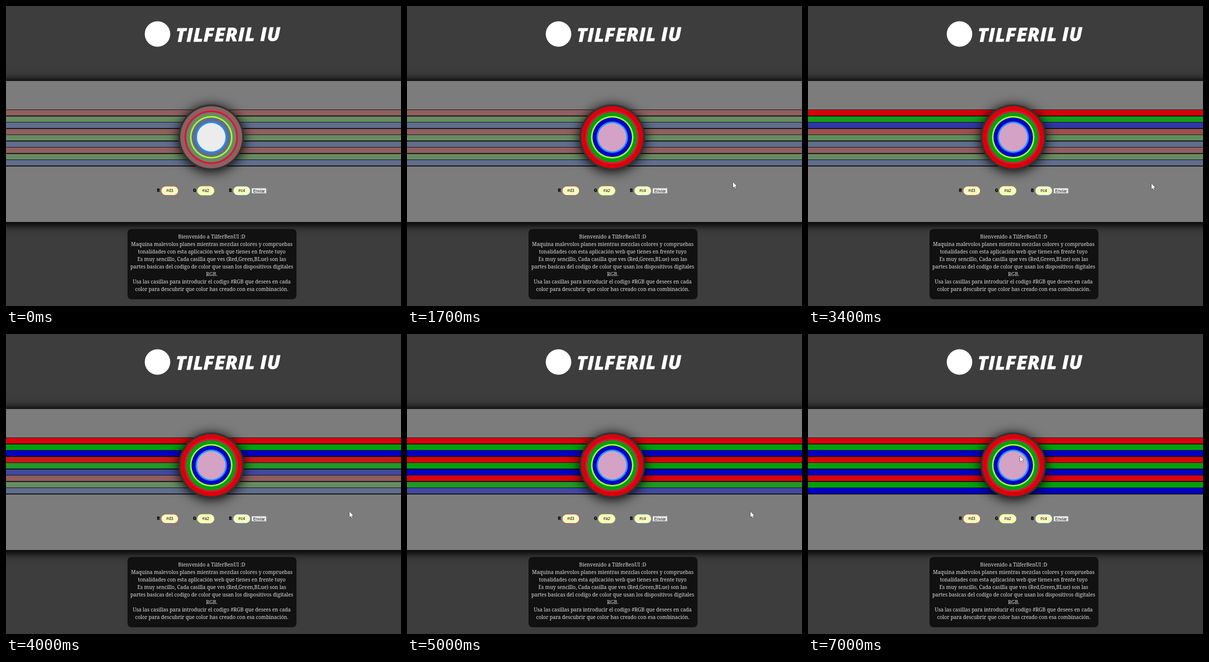
These frames come from a looping animation (790 by 600 pixels, 7100 ms). An HTML page with a canvas:

```html
<!DOCTYPE html>
<html lang="es">
<head>
<meta charset="utf-8">
<style>
  html, body { margin: 0; width: 100%; height: 100%; overflow: hidden; background: #3d3d3d; }
  canvas { display: block; }
</style>
</head>
<body>
<canvas id="stage" width="790" height="600"></canvas>
<script>
const ctx = document.getElementById('stage').getContext('2d');
const LOOP = 7100, STEP = 100, FADE = 1000;
const CX = 410.5, CY = 262.5;
const DIM = [[143, 96, 96], [104, 139, 99], [96, 109, 140]];
const VIVID = [[218, 0, 9], [0, 160, 10], [0, 0, 198]];
const RIMS = ['#dc143c', '#adff2f', '#1e90ff'];
const MIXED = [211, 162, 196];

// Start of each fade in ms
const RING_STARTS = [100, 350, 600];
const CENTER_START = 700;
const STRIPE_STARTS = [1950, 2600, 2900, 3230, 3310, 3670, 3970, 4300, 4680];

// Pointer path: time, x, y
const POINTER = [[1000, 790, 420], [1700, 652, 352], [2300, 687, 355], [5700, 687, 355], [6900, 424, 244]];

const MESSAGE = [
  'Bienvenido a TilferBenUI :D',
  'Maquina malevolos planes mientras mezclas colores y compruebas',
  'tonalidades con esta aplicación web que tienes en frente tuyo',
  'Es muy sencillo, Cada casilla que ves (Red,Green,BLue) son las',
  'partes basicas del codigo de color que usan los dispositivos digitales',
  'RGB.',
  'Usa las casillas para introducir el codigo #RGB que desees en cada',
  'color para descubrir que color has creado con esa combinación.'
];

const clamp = v => Math.max(0, Math.min(1, v));
const smooth = v => v * v * (3 - 2 * v);

function mix(from, to, t, start) {
  const k = clamp((t - start) / FADE);
  return `rgb(${from.map((v, i) => Math.round(v + (to[i] - v) * k))})`;
}

function disc(x, y, r, color) {
  ctx.fillStyle = color;
  ctx.beginPath();
  ctx.arc(x, y, r, 0, Math.PI * 2);
  ctx.fill();
}

function box(x, y, w, h, color, radius = 0, border) {
  ctx.beginPath();
  ctx.roundRect(x, y, w, h, radius);
  ctx.fillStyle = color;
  ctx.fill();
  if (border) {
    ctx.strokeStyle = border;
    ctx.lineWidth = 1;
    ctx.stroke();
  }
}

function label(text, x, y, font, color, align = 'center') {
  ctx.font = font;
  ctx.fillStyle = color;
  ctx.textAlign = align;
  ctx.fillText(text, x, y);
}

function shadowed(blur, offset, draw) {
  ctx.save();
  ctx.shadowColor = '#000';
  ctx.shadowBlur = blur;
  ctx.shadowOffsetY = offset;
  draw();
  ctx.restore();
}

const titleFont = size => `italic 800 condensed ${size}px "Open Sans", sans-serif`;
const TITLE = 'TILFERIL IU';
ctx.font = titleFont(50);
const titleSize = Math.min(53, 50 * 210 / ctx.measureText(TITLE).width);

function drawHeader() {
  disc(303, 56, 25.5, '#fff');
  ctx.save();
  ctx.translate(339, 72);
  ctx.rotate(-.01);
  label(TITLE, 0, 0, titleFont(titleSize), '#fff', 'left');
  ctx.restore();
}

function drawStripes(t) {
  box(0, 207, 790, 114, '#141414');
  STRIPE_STARTS.forEach((start, i) => {
    const top = Math.round(208 + i * 12.5), bottom = Math.round(219.2 + i * 12.5);
    box(0, top, 790, bottom - top, mix(DIM[i % 3], VIVID[i % 3], t, start));
  });
}

function drawDial(t) {
  shadowed(24, 3, () => disc(CX, CY, 65.5, '#333'));
  [62, 50, 39.5].forEach((r, i) => {
    disc(CX, CY, r, mix(DIM[i], VIVID[i], t, RING_STARTS[i]));
    disc(CX, CY, [53.5, 42.5, 31.5][i], RIMS[i]);
  });
  disc(CX, CY, 28.5, mix([236, 236, 236], MIXED, t, CENTER_START));
}

function drawForm() {
  ['#d3', '#a2', '#c4'].forEach((value, i) => {
    const x = 302 + i * 72;
    label('RGB'[i], x, 372, '900 8.5px Inter, sans-serif', '#000', 'left');
    ctx.setLineDash([1, 1]);
    box(x + 8.5, 360.5, 34, 18, '#f8fabe', 9, RIMS[i]);
    ctx.setLineDash([]);
    label(value, x + 25.5, 372, '8.4px "Liberation Sans", sans-serif', '#111');
  });
  box(491.5, 364.5, 29, 10, '#eee', 0, '#aaa');
  label('Enviar', 506, 372.5, '8.4px "Liberation Sans", sans-serif', '#111');
}

function drawMessage() {
  box(243, 446, 338, 140.5, '#111', 8);
  MESSAGE.forEach((line, i) =>
    label(line, 411.5, 465 + i * 15, '500 10.1px "Noto Serif", serif', '#e2e2e2'));
}

function drawPointer(t) {
  if (t < POINTER[0][0]) return;
  const next = POINTER.findIndex(p => p[0] > t);
  const b = POINTER[next < 0 ? POINTER.length - 1 : next];
  const a = next < 0 ? b : POINTER[next - 1];
  const k = a === b ? 0 : smooth((t - a[0]) / (b[0] - a[0]));
  ctx.save();
  ctx.translate(a[1] + (b[1] - a[1]) * k, a[2] + (b[2] - a[2]) * k);
  const arrow = new Path2D('M0 0V11.5L2.6 9L4.4 13L6 12.3L4.3 8.4H7.8Z');
  ctx.fillStyle = '#fff';
  ctx.strokeStyle = '#111';
  ctx.lineWidth = 1;
  ctx.stroke(arrow);
  ctx.fill(arrow);
  ctx.restore();
}

function frame() {
  const t = Math.floor(performance.now() % LOOP / STEP) * STEP;
  box(0, 0, 790, 600, '#3d3d3d');
  shadowed(18, 2, () => {
    box(-40, 150, 870, 282, '#7c7c7c');
    box(-40, 150, 870, 282, '#7c7c7c');
  });
  drawHeader();
  drawStripes(t);
  drawDial(t);
  drawForm();
  drawMessage();
  drawPointer(t);
  requestAnimationFrame(frame);
}
frame();
</script>
</body>
</html>
```
